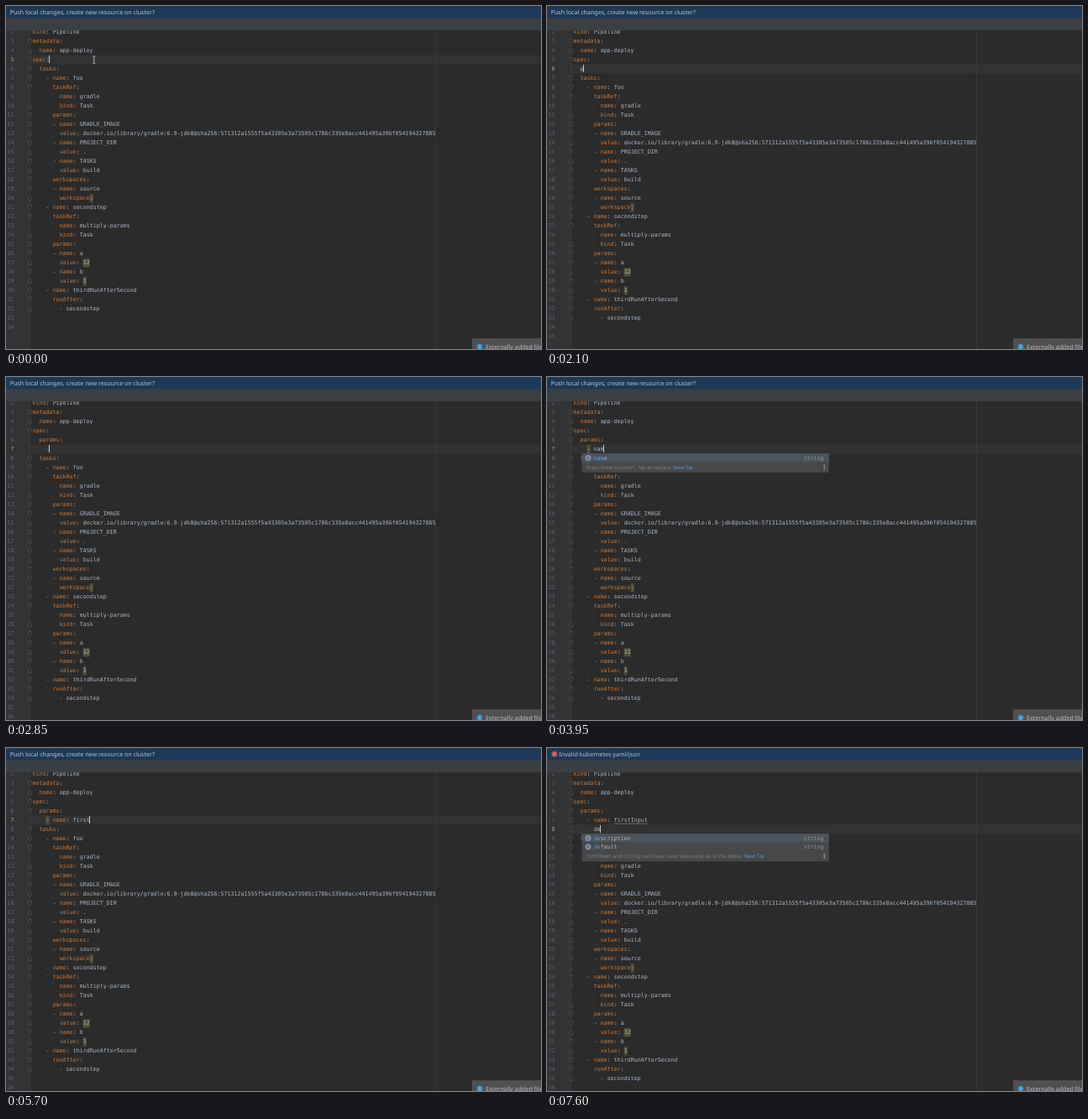
Write an HTML page that moves like this. It is 637 by 409 pixels and loops after 8 s.

```html
<!DOCTYPE html>
<html>
<head>
<meta charset="utf-8">
<style>
html, body { margin: 0; width: 100%; height: 100%; overflow: hidden; background: #2b2b2b; }
svg { display: block; width: 637px; height: 409px; }
text { white-space: pre; font: 6.655px "DejaVu Sans Mono", monospace; text-rendering: geometricPrecision; }
.ui { font: 7.1px "Noto Sans", "Open Sans", sans-serif; }
.tip { font-size: 6.06px; }
</style>
</head>
<body>
<svg id="stage" viewBox="0 0 637 409"></svg>
<script>
const stage = document.getElementById('stage');
const LOOP = 8000, LEFT = 31.6, CHAR = 4.005, ROW = 11;
const PLAIN = '#a9b7c6', KEY = '#cc7832', WARN = '#52503a', LINK = '#589df6';

const head = ['kind: Pipeline', 'metadata:', '  name: app-deploy', 'spec:'];
const tail = `  tasks:
    - name: foo
      taskRef:
        name: gradle
        kind: Task
      params:
      - name: GRADLE_IMAGE
        value: docker.io/library/gradle:6.9-jdk8@sha256:571312a1555f5a43305e3a73505c1786c335e8acc441495a396f054194327885
      - name: PROJECT_DIR
        value: .
      - name: TASKS
        value: build
      workspaces:
      - name: source
        workspace:
    - name: secondstep
      taskRef:
        name: multiply-params
        kind: Task
      params:
      - name: a
        value: 12
      - name: b
        value: 1
    - name: thirdRunAfterSecond
      runAfter:
        - secondstep

`.split('\n');

// Finished lines, and the moment each new line is opened
const added = ['  params:', '    - name: firstInput'];
const opened = [1450, 2700, 6750];

// The line being typed, by time
const typed = [
  [1450, '  '], [2050, '  p'], [2350, '  pa'], [2500, '  par'],
  [2700, '    '], [2850, '    -'], [3550, '    - '],
  [3700, '    - n'], [3850, '    - na'], [3950, '    - nam'],
  [4050, '    - name'], [4400, '    - name:'], [4550, '    - name: '],
  ...[...'first'].map((c, i) => [4800 + 150 * i, '    - name: ' + 'first'.slice(0, i + 1)]),
  ...[...'Input'].map((c, i) => [5750 + 150 * i, '    - name: first' + 'Input'.slice(0, i + 1)]),
  [6750, '      '], [7450, '      d'], [7600, '      de']
];

// start, end, row, column, entries, type, tip
const popups = [
  [2250, 2700, 6, 2, ['params'], 'array', 'Press Ctrl+. to choose the selected (or first) suggestion and insert a dot afterwards'],
  [3700, 3850, 7, 6, ['name', 'description'], 'string', 'Press Enter to insert, Tab to replace'],
  [3850, 4250, 7, 6, ['name'], 'string', 'Press Enter to insert, Tab to replace'],
  [7500, 8000, 8, 6, ['description', 'default'], 'string', 'Ctrl+Down and Ctrl+Up will move caret down and up in the editor']
];

const rect = (x, y, w, h, fill) => `<rect x="${x}" y="${y}" width="${w}" height="${h}" fill="${fill}"/>`;
const text = (x, y, s, fill, attr = '') => `<text x="${x}" y="${y}" fill="${fill}" ${attr}>${s}</text>`;
const path = (d, stroke, fill = 'none') => `<path d="${d}" stroke="${stroke}" fill="${fill}" stroke-width=".7"/>`;
const dot = (x, y, r, fill) => `<circle cx="${x}" cy="${y}" r="${r}" fill="${fill}"/>`;
const midY = n => 31 + ROW * (n - 2);
const colX = c => LEFT + CHAR * c;

function codeLine(line, y) {
  const part = (col, s, fill) => s.trim() ? text(colX(col + s.search(/\S/)), y + 2.4, s.trim(), fill) : '';
  const m = line.match(/^( *(?:- )?)(\w+)(:)(.*)$/);
  if (!m) return part(0, line, PLAIN);
  let col = 0;
  return m.slice(1).map((s, i) => {
    const out = part(col, s, i == 1 ? KEY : PLAIN);
    col += s.length;
    return out;
  }).join('');
}

function foldMark(line, y) {
  if (!line.trim() || /^ {8}name/.test(line)) return '';
  const start = /^ *- name|:$/.test(line) && !/workspace:/.test(line);
  const k = start ? 1 : -1;
  return path(`M26.7 ${y - 2.5 * k}h3.8v${3 * k}l-1.9 ${2 * k}l-1.9 ${-2 * k}z`, '#515456', '#2d2e2f');
}

function guides(line, y) {
  const depth = line.trim() ? line.search(/\S/) : 8;
  return [2, 4, 6].filter(c => c < depth)
    .map(c => rect(colX(c), y - 5.5, .6, ROW, '#363636')).join('');
}

function warnings(line, y, dashWarned) {
  const mark = (col, n) => rect(colX(col), y - 4.8, CHAR * n, 10.2, WARN);
  const num = line.match(/value: (\d+)$/);
  if (num) return mark(15, num[1].length);
  if (/ workspace:$/.test(line)) return mark(17, 1);
  return dashWarned ? mark(4, 1) : '';
}

function popup([, , n, col, entries, type, tip], prefix) {
  const step = 10.4, x = colX(col) - 14, y = midY(n) + 5.2;
  const foot = y + step * entries.length, h = foot - y + 12.3;
  let out = rect(x, y, 294, h, '#46484a') + rect(x, y, 294, step, '#4a545a');
  entries.forEach((name, i) => {
    const c = y + 5.2 + step * i;
    out += type == 'array'
      ? text(x + 3, c + 2.2, '[]', '#c0c4c8')
      : dot(x + 7.4, c, 3.5, '#8c91ae') + text(x + 5.7, c + 1.6, 'p', '#3a4058', 'style="font-size:5.5px"');
    const hit = name.startsWith(prefix) ? prefix : '';
    out += text(x + 14, c + 2.4, `<tspan fill="${LINK}">${hit}</tspan>${name.slice(hit.length)}`, '#bbbbbb') +
      text(x + 288, c + 2.4, type, '#919496', 'text-anchor="end"');
  });
  out += text(x + 5.5, foot + 8.2, `${tip}<tspan dx="3" fill="${LINK}">Next Tip</tspan>`, '#7e8183', 'class="ui tip"');
  for (const d of [-2.3, 0, 2.3]) out += dot(x + 288.5, foot + 5.8 + d, .75, '#c4c6c8');
  return out;
}

function draw(t) {
  const count = opened.filter(o => t >= o).length;
  const current = 5 + count;
  const now = (typed.filter(s => t >= s[0]).pop() || [0, 'spec:'])[1];
  const lines = [...head, ...(count ? [...added.slice(0, count - 1), now] : []), ...tail];
  const caretOn = t < 350 || t >= 850;

  let out = rect(0, 0, 637, 409, '#2b2b2b') + rect(0, 29, 28.5, 380, '#313335') +
    rect(0, midY(current) - 5.4, 637, ROW, '#323232') +
    rect(28.3, 29, .6, 380, '#3f4244') + rect(511.2, 29, .8, 380, '#3d3d3d');

  lines.forEach((line, i) => {
    const n = i + 2, y = midY(n);
    const isNew = n > 5 && n <= current;
    const dashWarned = n == 7 && t >= 3150 && t < 6750;
    const folded = n > 2 && (!isNew || n == 6 && t >= 3150);
    out += (n > 5 && !isNew ? guides(line, y) : '') + warnings(line, y, dashWarned) + codeLine(line, y) +
      text(9.5, y + 2.4, n, n == current ? '#a4a3a3' : '#606366', 'text-anchor="end"') +
      (folded ? foldMark(line, y) : '');
  });
  if (t >= 7150) {
    out += foldMark('- name', midY(7)) + foldMark('end', midY(8));
  }
  if (t >= 6750) out += rect(colX(12), midY(7) + 3.8, 40, .7, '#8f9070');
  if (caretOn) out += rect(Math.floor(colX(now.length)), midY(current) - 5, 1, 9, '#c8c8c8');
  if (t < 1150) out += path('M103.2 60h1l.6.6.6-.6h1M104.8 60.5v7.5M103.2 68.5h1l.6-.6.6.6h1', '#e4e4e4');

  const open = popups.find(p => t >= p[0] && t < p[1]);
  if (open) out += popup(open, now.replace(/^[ -]+/, ''));

  const invalid = t >= 2150 && t < 2850 || t >= 7500;
  out += rect(0, 14, 637, 15, '#3c3f41') + rect(0, 0, 637, 14.6, '#1e3958');
  out += invalid
    ? dot(8.9, 7.2, 3.4, '#b9564f') + rect(8.5, 5.2, .8, 2.5, '#d9b4b0') + rect(8.5, 8.4, .8, .8, '#d9b4b0') +
      text(14.4, 10, 'Invalid kubernetes yaml/json', '#bcc3ca', 'class="ui"')
    : text(4.7, 10, 'Push local changes, create new resource on cluster?', '#bcc3ca', 'class="ui"');

  out += rect(555, 396.3, 82, 13, '#4e5052') + dot(564, 406.2, 3.5, '#3592c4') +
    rect(563.6, 404.1, .9, .9, '#c4dcea') + rect(563.6, 405.6, .9, 2.7, '#c4dcea') +
    text(571, 409.2, 'Externally added files', '#bbbbbb', 'class="ui"');
  return out;
}

let last = '';
function frame(ms) {
  const next = draw(ms % LOOP);
  if (next != last) stage.innerHTML = last = next;
  requestAnimationFrame(frame);
}
frame(0);
</script>
</body>
</html>
```
